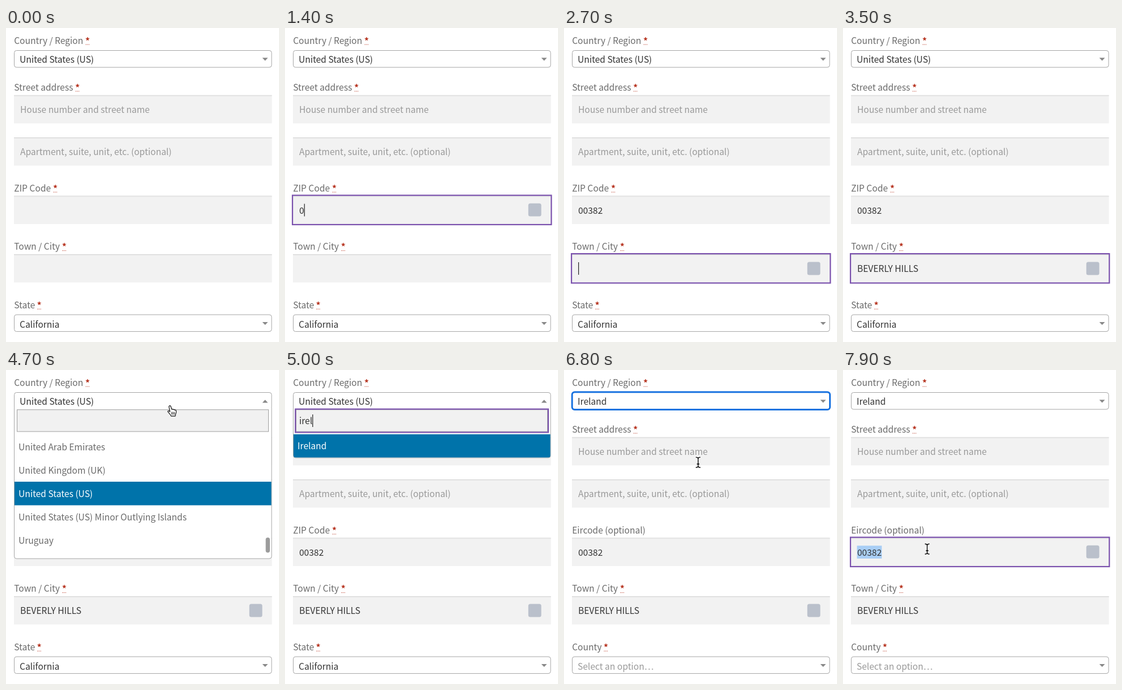
These frames come from a looping animation (480x551 px, 8 s). An HTML page:

```html
<!DOCTYPE html>
<html lang="en">
<head>
<meta charset="utf-8">
<title>Address form</title>
<style>
  html, body { margin: 0; width: 100%; height: 100%; overflow: hidden; background: #fff; }
  svg { display: block; width: 100%; height: 100%; }
  text {
    font: 400 15.5px "Noto Sans CJK JP", "Noto Sans CJK SC", "Noto Sans CJK", "Source Sans Pro", "Noto Sans", sans-serif;
    fill: #6a6a6a;
    white-space: pre;
  }
  .value { fill: #333; }
  .hint { fill: #999; }
  .picked { fill: #fff; }
  .star { font-weight: 700; fill: #b5301c; }
  .box { fill: #fff; stroke: #a6a6a6; }
  .ring { fill: none; stroke: #7b52ad; stroke-width: 2.2; }
  .focus { fill: none; stroke: #1a73e0; stroke-width: 3; }
  .badge { fill: #bac0cb; }
  .row { fill: #0073aa; }
  .caret { fill: #222; }
  .mark { fill: #a9cef5; }
  .cursor { stroke-linejoin: round; stroke-linecap: round; }
</style>
</head>
<body>
<svg viewBox="0 0 480 551" preserveAspectRatio="none">
  <defs>
    <g id="field">
      <rect width="453.5" height="49.5" fill="#f2f2f2"/>
      <rect width="453.5" height="1" fill="#d6d6d6"/>
      <rect y="1" width="453.5" height="1" fill="#e9e9e9"/>
    </g>
    <rect id="select" class="box" x="14.5" y="0.5" width="452.5" height="29.5" rx="4"/>
    <path id="down" d="M450.7 0h9.8l-4.9 5.2z" fill="#888"/>
    <path id="up" d="M450.7 5.2h9.8l-4.9 -5.2z" fill="#888"/>
    <g id="star">
      <text class="star" y="1">*</text>
      <path d="M0.5 1.5h6.6" stroke="#b5301c" stroke-dasharray="1.2 1.4"/>
    </g>
    <rect id="ring" class="ring" x="13.1" y="-0.9" width="455.2" height="51.4"/>
    <rect id="badge" class="badge" x="427.8" y="13.2" width="22.8" height="22.8" rx="3.5"/>
  </defs>

  <!-- country -->
  <text x="14.2" y="27.5">Country / Region</text>
  <use href="#star" x="139.6" y="27.5"/>
  <use href="#select" y="39"/>
  <text class="value" x="24" y="61" data-on="0-5600">United States (US)</text>
  <text class="value" x="24" y="61" data-on="5600-8000">Ireland</text>
  <use href="#down" y="52.3" data-on="0-4500 5600-8000"/>
  <rect class="focus" x="14.2" y="38.8" width="453.4" height="30.6" rx="4.5" data-on="5600-7700"/>

  <!-- street -->
  <text x="14.2" y="109.5">Street address</text>
  <use href="#star" x="121.8" y="109.5"/>
  <use href="#field" x="14" y="117.8"/>
  <text class="hint" x="25" y="149">House number and street name</text>
  <use href="#field" x="14" y="192"/>
  <text class="hint" x="25" y="223.2">Apartment, suite, unit, etc. (optional)</text>

  <!-- postcode -->
  <g data-on="0-5600">
    <text x="14.2" y="286.5">ZIP Code</text>
    <use href="#star" x="82.8" y="286.5"/>
  </g>
  <text x="14.2" y="286.5" data-on="5600-8000">Eircode (optional)</text>
  <use href="#field" x="14" y="294.5"/>
  <g data-on="1000-2600 7700-8000">
    <use href="#ring" y="294.5"/>
    <use href="#badge" y="294.5"/>
  </g>
  <rect class="mark" x="24.6" y="308.3" width="43.6" height="22.6" data-on="7900-8000"/>
  <text class="value" id="zip" x="25" y="325.7"></text>
  <rect class="caret" id="zipCaret" y="308.5" width="1.2" height="22" data-on="1000-2600 7700-7900"/>

  <!-- town -->
  <text x="14.2" y="389.2">Town / City</text>
  <use href="#star" x="98.6" y="389.2"/>
  <use href="#field" x="14" y="397"/>
  <use href="#ring" y="397" data-on="2600-4500"/>
  <use href="#badge" y="397.4" data-on="2600-7700"/>
  <text class="value" x="25" y="428" data-on="2900-8000">BEVERLY HILLS</text>
  <rect class="caret" x="25" y="411" width="1.2" height="22" data-on="2600-2900"/>

  <!-- state -->
  <g data-on="0-5600">
    <text x="14.2" y="491.7">State</text>
    <use href="#star" x="54.6" y="491.7"/>
  </g>
  <g data-on="5600-8000">
    <text x="14.2" y="491.7">County</text>
    <use href="#star" x="69.8" y="491.7"/>
  </g>
  <use href="#select" y="502.6"/>
  <use href="#down" y="515.9"/>
  <text class="value" x="24" y="525.5" data-on="0-5600">California</text>
  <text class="hint" x="24" y="525.5" data-on="5600-8000">Select an option…</text>

  <!-- dropdown -->
  <g data-on="4500-4900">
    <path class="box" d="M14.5 66V327q0 4 4 4H463q4 0 4 -4V66" />
    <text x="22" y="140.5">United Arab Emirates</text>
    <text x="22" y="181.8">United Kingdom (UK)</text>
    <rect class="row" x="15" y="196" width="451.5" height="41.4"/>
    <text class="picked" x="22" y="222.7">United States (US)</text>
    <text x="22" y="264">United States (US) Minor Outlying Islands</text>
    <text x="22" y="305.3">Uruguay</text>
    <rect x="456.6" y="294" width="7.4" height="26.4" rx="3.7" fill="#9c9c9c"/>
  </g>
  <g data-on="4900-5600">
    <path class="box" d="M14.5 66V150q0 4 4 4H463q4 0 4 -4V66"/>
    <path class="row" d="M15 112.7H466.5V150q0 3.6 -3.6 3.6H18.6q-3.6 0 -3.6 -3.6z"/>
    <text class="picked" x="22" y="139.3">Ireland</text>
  </g>
  <g data-on="4500-5600">
    <use href="#up" y="52.3"/>
    <rect x="19.5" y="69.7" width="442" height="38.3" fill="#f1f1f1" stroke="#a0a0a0"/>
    <rect class="ring" x="18.3" y="68.6" width="444.6" height="40.8" data-on="4800-5600"/>
    <text class="value" id="search" x="25" y="94.8"></text>
    <rect class="caret" id="searchCaret" y="78" width="1.2" height="22" data-on="4800-5600"/>
  </g>

  <!-- pointer -->
  <g id="cursor" class="cursor">
    <path data-kind="arrow" d="M0 0V15.5L3.6 12.2L6 17.8L8.6 16.7L6.2 11.2H11.2Z" fill="#000" stroke="#fff"/>
    <g data-kind="beam" fill="none">
      <path id="beam" d="M-3.6 -8.8Q-0.2 -8.8 0 -6.6Q0.2 -8.8 3.6 -8.8M0 -6.6V6.8M-3.6 9Q-0.2 9 0 6.8Q0.2 9 3.6 9M-1.8 3H1.8" stroke="#fff" stroke-width="3"/>
      <use href="#beam" style="stroke:#000"/>
      <path d="M-3.6 -8.8Q-0.2 -8.8 0 -6.6Q0.2 -8.8 3.6 -8.8M0 -6.6V6.8M-3.6 9Q-0.2 9 0 6.8Q0.2 9 3.6 9M-1.8 3H1.8" stroke="#000" stroke-width="1.4"/>
    </g>
    <g data-kind="hand">
      <path d="M-2 1.3Q-1.7 -0.6 0 -0.3Q1.1 0 1.5 1.5L2.8 6Q4.6 5 5.5 6.5Q7.2 5.7 8.1 7.3Q10.4 6.8 10.8 9.2Q11.2 12.2 9.6 14.6L9.2 17.8H1.8Q0.8 15.6 -1.2 13.4L-3.8 10.4Q-4.2 8.4 -2.2 8.6L-0.2 10.2Z" fill="#fff" stroke="#111" stroke-width="1.2"/>
      <path d="M3 11v4M5.3 11v4M7.6 11v4" stroke="#111" fill="none"/>
    </g>
  </g>
</svg>
<script>
const LOOP = 8000, STEP = 100;
const $ = id => document.getElementById(id);
const show = (el, on) => { el.style.display = on ? '' : 'none'; };

const timed = [...document.querySelectorAll('[data-on]')].map(el => ({
  el, spans: el.dataset.on.split(' ').map(s => s.split('-').map(Number))
}));

// keys: [time, number of letters shown]
const typed = [
  { id: 'zip', word: '00382', keys: [[1300, 1], [1500, 2], [1800, 3], [2000, 4], [2300, 5]] },
  { id: 'search', word: 'ireland', keys: [[4800, 1], [4900, 3], [5000, 4], [5100, 5], [5200, 6], [5300, 7]] }
];

// the pointer is visible from..to and travels a -> b during move
const trips = [
  { from: 500, to: 1300, move: [600, 1000], a: [227, 255], b: [172, 316] },
  { from: 3600, to: 4100, move: [3500, 4000], a: [172, 316], b: [287, 92] },
  { from: 4100, to: 4800, move: [4100, 4400], a: [287, 92], b: [288.5, 63] },
  { from: 6400, to: 8000, move: [6700, 7500], a: [256, 127], b: [148, 314] }
];
const fields = [[118, 167], [192, 242], [294, 344], [397, 446]];
const cursor = $('cursor');
const shapes = [...cursor.querySelectorAll('[data-kind]')];

const ease = p => 1 - Math.pow(1 - p, 1.55);

function kindAt(y) {
  if (y < 70) return 'hand';
  return fields.some(([top, end]) => y >= top && y <= end) ? 'beam' : 'arrow';
}

function drawCursor(t) {
  const trip = trips.find(m => t >= m.from && t < m.to);
  show(cursor, trip);
  if (!trip) return;
  const [start, end] = trip.move;
  const p = ease(Math.min(1, Math.max(0, (t - start) / (end - start))));
  const [x, y] = trip.a.map((v, i) => v + (trip.b[i] - v) * p);
  cursor.setAttribute('transform', `translate(${x} ${y})`);
  shapes.forEach(s => show(s, s.dataset.kind === kindAt(y)));
}

function drawTyping(t) {
  for (const { id, word, keys } of typed) {
    const count = keys.reduce((n, [at, len]) => t >= at ? len : n, 0);
    const el = $(id), text = word.slice(0, count);
    if (el.textContent !== text) el.textContent = text;
    $(id + 'Caret').setAttribute('x', 25 + (count ? el.getComputedTextLength() : 0));
  }
}

function draw(now) {
  const t = Math.floor(now % LOOP / STEP) * STEP;
  timed.forEach(({ el, spans }) => show(el, spans.some(([a, b]) => t >= a && t < b)));
  drawTyping(t);
  drawCursor(t);
}

let begin;
function tick(now) {
  begin ??= now;
  draw(now - begin);
  requestAnimationFrame(tick);
}
draw(0);
requestAnimationFrame(tick);
</script>
</body>
</html>
```
